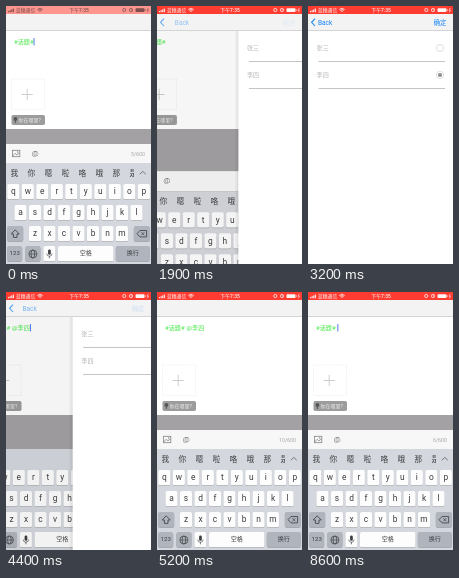
An HTML page with a canvas for the animation above (8.7 s loop, 145x258 px).

```html
<!DOCTYPE html>
<html lang="zh">
<head>
<meta charset="utf-8">
<style>
html, body { margin: 0; width: 100%; height: 100%; overflow: hidden; background: #fff; }
canvas { display: block; width: 145px; height: 258px; }
</style>
</head>
<body>
<canvas id="stage"></canvas>
<script>
const W = 145, H = 258, LOOP = 8700, STEP = 100;
const FONT = '"Roboto", "Noto Sans CJK SC", "Noto Sans CJK", sans-serif';
const BLUE = '#1684f5', GREEN = '#42e642', INK = '#3c3d40', GRAY_KEY = '#afb4bd', KEY_BG = '#d4d7dd';
const canvas = document.getElementById('stage');
const ctx = canvas.getContext('2d');
const scale = window.devicePixelRatio || 1;
canvas.width = Math.round(W * scale);
canvas.height = Math.round(H * scale);

const clamp = v => Math.max(0, Math.min(1, v));
const mix = (a, b, p) => a + (b - a) * p;
const span = (t, from, to) => clamp((t - from) / (to - from));
const smooth = p => p * p * (3 - 2 * p);
const easeOut = p => 1 - (1 - p) ** 3;

// Caret opacity: [time, value]
const CARET = [[0, 1], [200, 1], [600, 0], [700, 0], [1000, 1], [1200, 1], [1600, 0],
  [4100, 0], [4200, 1], [5000, 1], [5200, 0], [5300, 0], [5600, 1], [5800, 1], [6200, 0],
  [6300, 0], [6600, 1], [6800, 1], [7200, 0], [7300, 0], [7500, 1], [8000, 1], [8200, 0],
  [8500, 0], [8600, 1], [8700, 1]];

function track(keys, t) {
  const i = keys.findIndex(k => k[0] > t);
  if (i < 1) return keys[keys.length - 1][1];
  const [a, b] = [keys[i - 1], keys[i]];
  return mix(a[1], b[1], span(t, a[0], b[0]));
}

function rect(x, y, w, h, color) {
  ctx.fillStyle = color;
  ctx.fillRect(x, y, w, h);
}

function round(x, y, w, h, r, color) {
  ctx.beginPath();
  ctx.roundRect(x, y, w, h, r);
  ctx.fillStyle = color;
  ctx.fill();
}

function dot(x, y, r, color) {
  ctx.beginPath();
  ctx.arc(x, y, r, 0, 7);
  ctx.fillStyle = color;
  ctx.fill();
}

function ring(x, y, r, color, width = 0.6) {
  ctx.beginPath();
  ctx.arc(x, y, r, 0, 7);
  ctx.strokeStyle = color;
  ctx.lineWidth = width;
  ctx.stroke();
}

function line(points, color, width = 0.7) {
  ctx.beginPath();
  points.forEach(([x, y]) => ctx.lineTo(x, y));
  ctx.strokeStyle = color;
  ctx.lineWidth = width;
  ctx.stroke();
}

function text(str, x, y, size, color, align = 'left', weight = 400) {
  ctx.font = `${weight} ${size}px ${FONT}`;
  ctx.textAlign = align;
  ctx.textBaseline = 'alphabetic';
  ctx.fillStyle = color;
  ctx.fillText(str, x, y + size * 0.36);
}

function group(x, y, alpha, draw) {
  ctx.save();
  ctx.translate(x, y);
  ctx.globalAlpha *= alpha;
  draw();
  ctx.restore();
}

function statusBar(t) {
  const p = span(t, 0, 400);
  rect(0, 0, W, 8, `rgb(254,${mix(150, 60, p)},${mix(143, 50, p)})`);
  const ink = `rgb(${mix(125, 255, p)},${mix(80, 245, p)},${mix(78, 243, p)})`;
  for (let i = 0; i < 4; i++) rect(2 + i * 1.6, 5 - i * 0.8, 1.1, 1.2 + i * 0.8, ink);
  text('蓝穗通信', 10, 4, 4.8, ink);
  for (let r = 1; r <= 3; r++) {
    ctx.beginPath();
    ctx.arc(34, 6.3, r * 1.3, -2.35, -0.79);
    ctx.strokeStyle = ink;
    ctx.lineWidth = 0.8;
    ctx.stroke();
  }
  text('下午7:35', 73, 4, 4.9, ink, 'center', 500);
  ring(118.3, 4, 1.6, ink, 0.8);
  ring(125, 4, 1.7, ink, 0.7);
  line([[125, 3], [125, 4.2], [126, 4.2]], ink, 0.5);
  round(129.5, 2.2, 9, 3.8, 0.8, ink);
  rect(138.9, 3.3, 0.7, 1.6, ink);
  line([[142.4, 2], [141, 4.2], [142.5, 4.2], [141.3, 6.3]], ink, 0.6);
}

function navBar(cover) {
  rect(0, 8, W, 16, '#f3f3f4');
  rect(0, 24, W, 1, '#d4d4d6');
  if (!cover) return;
  group(0, 0, Math.sqrt(cover), () =>
    line([[7, 12.6], [3.6, 16.3], [7, 20]], BLUE, 1.1));
  group((1 - cover) * 14, 0, cover, () => text('Back', 10, 16.4, 6.5, BLUE));
  group(0, 0, cover ** 3, () => text('确定', 138.5, 16.4, 6.4, BLUE, 'right'));
}

function toolbar(y, count) {
  group(0, y, 1, () => {
    rect(0, 0, W, 20, '#f7f7f8');
    ctx.strokeStyle = '#858585';
    ctx.lineWidth = 0.8;
    ctx.strokeRect(6.4, 6.3, 7.4, 6.4);
    line([[6.6, 12], [9.2, 9.3], [10.8, 10.9], [13.6, 8.8]], '#858585', 0.8);
    dot(11.7, 8, 0.7, '#858585');
    text('@', 29, 9.4, 8, '#858585', 'center');
    text(count + '/600', 139, 9.8, 5.3, '#a6a6a6', 'right');
  });
}

function composer(t, toolbarY) {
  const mention = t >= 4200 && t < 7500;
  rect(0, 24, W, H - 24, '#fff');
  text('#话题#', 8, 35.7, 6.1, GREEN);
  if (mention) text('@李四', 29.6, 35.7, 6.1, GREEN);
  const caretX = mention ? 47.6 : t >= 7500 ? 29.4 : 27.6;
  group(0, 0, track(CARET, t), () => rect(caretX, 32, 0.9, 7.4, '#3f73e8'));

  ctx.strokeStyle = '#e8e8e8';
  ctx.lineWidth = 0.6;
  ctx.setLineDash([1.5, 1]);
  ctx.strokeRect(5.5, 73, 33, 30.5);
  ctx.setLineDash([]);
  line([[15.5, 88.5], [26.8, 88.5]], '#c2c2c2', 0.8);
  line([[21.2, 82.8], [21.2, 94.2]], '#c2c2c2', 0.8);

  round(5.5, 109, 33.5, 10, 1.8, '#9c9c9c');
  dot(9.4, 113, 1.9, '#555');
  line([[9.4, 114], [9.4, 117]], '#555', 1);
  text('你在哪里?', 12.4, 114.2, 5, '#ececec');
  rect(0, 123, W, H - 123, '#a3a1a3');
  toolbar(toolbarY, mention ? 10 : t >= 7500 ? 6 : 5);
}

function key(label, x, y, w, size = 8.4, fill = '#fdfdfd') {
  round(x, y + 0.7, w, 15.3, 1.9, '#a3a6ab');
  round(x, y, w, 15.3, 1.9, fill);
  if (label) text(label, x + w / 2, y + 7.3, size, INK, 'center');
}

function keyboard(words, deleting) {
  rect(0, 157, W, H - 157, KEY_BG);
  if (words) {
    ctx.save();
    ctx.beginPath();
    ctx.rect(0, 157, 128, 20);
    ctx.clip();
    [...'我你嗯啦咯哦那是'].forEach((c, i) =>
      text(c, 8.3 + i * 17, 167.3, 7.7, INK, 'center'));
    ctx.restore();
    line([[133.8, 168.2], [136.8, 165.4], [139.8, 168.2]], '#5c6066', 0.8);
  }
  ['qwertyuiop', 'asdfghjkl', 'zxcvbnm'].forEach((row, r) =>
    [...row].forEach((c, i) =>
      key(c, [1.2, 8.4, 22.9][r] + i * 14.5, [178, 199, 220][r], 12.2)));

  key('', 1.2, 220, 16, 0, GRAY_KEY);
  line([[9.2, 223.8], [5.2, 228], [7.4, 228], [7.4, 231.4], [11, 231.4],
    [11, 228], [13.2, 228], [9.2, 223.8]], INK, 0.8);
  key('', 127.8, 220, 16, 0, deleting ? '#fff' : GRAY_KEY);
  line([[131, 227.7], [134, 224.5], [140.6, 224.5], [140.6, 230.9], [134, 230.9],
    [131, 227.7]], INK, 0.8);
  line([[135.3, 226.2], [138.3, 229.2]], INK);
  line([[138.3, 226.2], [135.3, 229.2]], INK);

  const y = 240;
  key('123', 1.2, y, 15, 6.1, GRAY_KEY);
  key('', 19.3, y, 15.2, 0, GRAY_KEY);
  ring(26.9, 248, 4, INK, 0.7);
  ctx.beginPath();
  ctx.ellipse(26.9, 248, 1.8, 4, 0, 0, 7);
  ctx.stroke();
  line([[22.9, 248], [30.9, 248]], INK, 0.6);
  key('', 37.4, y, 12, 0);
  round(42.1, 243.4, 2.7, 5.4, 1.3, INK);
  ctx.beginPath();
  ctx.arc(43.4, 247.5, 2.7, 0, Math.PI);
  ctx.stroke();
  line([[43.4, 250.2], [43.4, 252.3]], INK, 0.7);
  key('空格', 52, y, 55.5, 6.1);
  key('换行', 109.8, y, 34, 6.1, GRAY_KEY);
}

function contacts(t) {
  rect(0, 24, W, H - 24, '#fff');
  ['张三', '李四'].forEach((name, i) => {
    const y = 42 + i * 27;
    text(name, 8.6, y, 6.1, '#b2b2b2');
    rect(10.5, y + 13, 126.5, 1, '#c4c4c4');
    ring(132, y, 3.6, '#d6d6d6', 0.8);
    if (i === 1 && t >= 3200) dot(132, y, 2.1, '#8e8e8e');
  });
}

function draw(t) {
  const returning = t >= 4200;
  const push = t < 1900 ? 0 : easeOut(span(t, 1830, 2230));
  const cover = returning ? 1 - smooth(span(t, 4160, 4667)) : push;
  const hidden = t < 1900 ? 0 : returning ? 1 - smooth(span(t, 4600, 5000)) : span(t, 1830, 2080);
  const keyboardDrop = returning ? 0 : hidden * 101;

  ctx.setTransform(canvas.width / W, 0, 0, canvas.height / H, 0, 0);
  rect(0, 0, W, H, '#fff');
  if (cover < 1) {
    group(-cover * W * 0.3, 0, 1, () => {
      composer(t, mix(138, 235, hidden));
      group(0, keyboardDrop, 1, () =>
        keyboard(!returning || t >= 4700, t >= 7400 && t < 7600));
    });
    rect(0, 24, W, H - 24, `rgba(0,0,0,${cover * 0.08})`);
  }
  if (cover > 0) {
    const x = (1 - cover) * W;
    const shade = ctx.createLinearGradient(x - 4, 0, x, 0);
    shade.addColorStop(0, 'rgba(0,0,0,0)');
    shade.addColorStop(1, 'rgba(0,0,0,.1)');
    rect(x - 4, 24, 4, H - 24, shade);
    group(x, 0, 1, () => contacts(t));
  }
  navBar(cover);
  statusBar(t);
}

const start = performance.now();
function tick() {
  const t = (performance.now() - start) % LOOP;
  draw(Math.floor(t / STEP) * STEP);
  requestAnimationFrame(tick);
}
tick();
</script>
</body>
</html>
```
